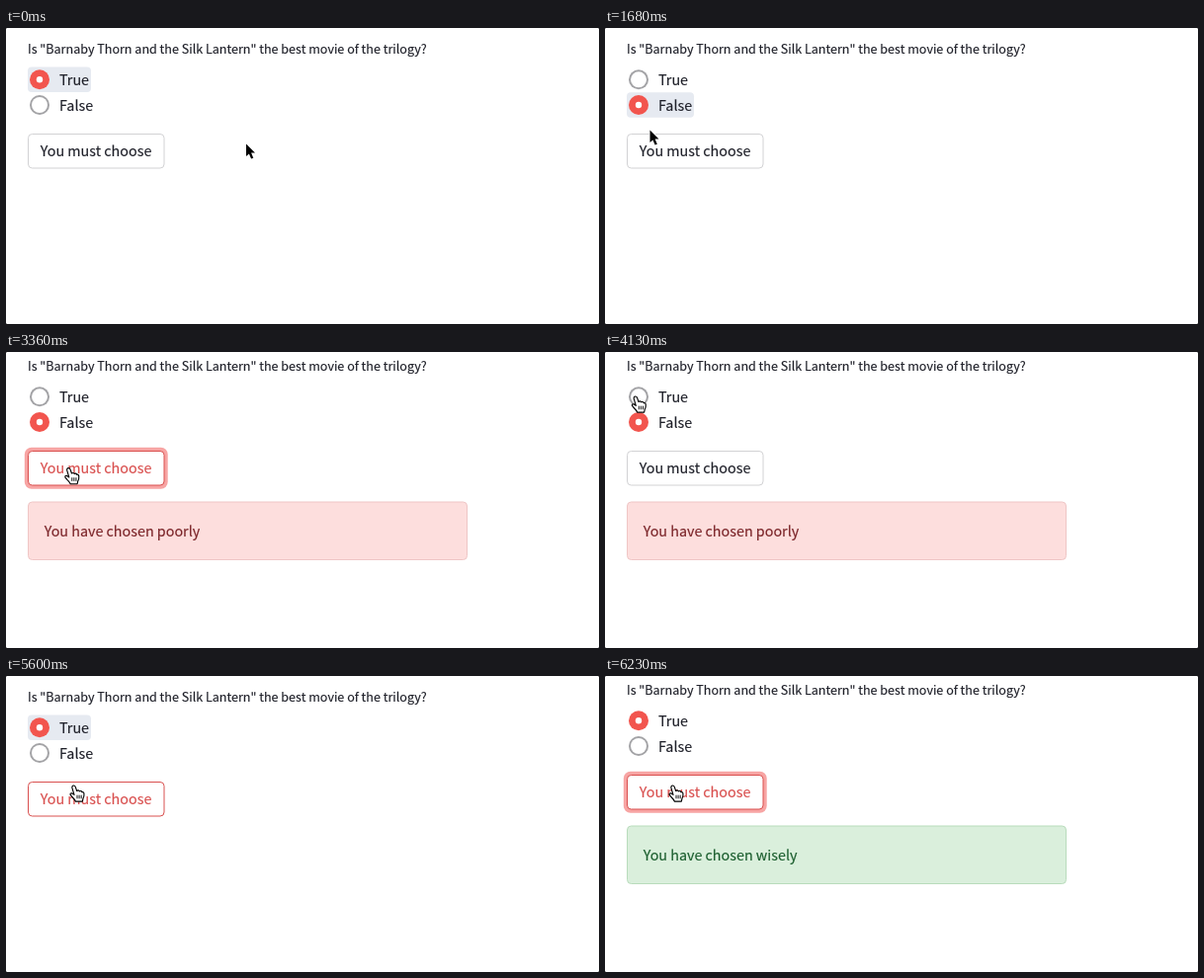
An HTML page with a canvas that plays this animation: 600 by 300 pixels, repeating every 7.21 s.

```html
<!DOCTYPE html>
<html lang="en">
<head>
<meta charset="utf-8">
<title>Radio quiz</title>
<style>
  html, body { margin: 0; width: 100%; height: 100%; overflow: hidden; background: #fff; }
  canvas { display: block; width: 600px; height: 300px; }
</style>
</head>
<body>
<canvas id="stage"></canvas>
<script>
const LOOP = 7210, STEP = 70, SCROLL = 7;
const FONT = '"Noto Sans CJK JP", "Noto Sans CJK SC", "Noto Sans CJK", "Open Sans", sans-serif';
const SMALL = 12.55, BODY = 14.34;
const INK = '#1f2029', RED = '#d9504f', RADIO_RED = '#f2554e', RING = '#a3a3a6';
const QUESTION = 'Is "Barnaby Thorn and the Silk Lantern" the best movie of the trilogy?';

const canvas = document.getElementById('stage');
const ctx = canvas.getContext('2d', { alpha: false });
const dpr = window.devicePixelRatio || 1;
canvas.width = 600 * dpr;
canvas.height = 300 * dpr;

// Pointer hotspot: time, x, y
const PATH = [
  [0, 243, 117], [210, 330, 124], [280, 330, 124], [350, 331, 124],
  [630, 331, 124], [1120, 34, 75], [1260, 34, 75], [1330, 4, 90],
  [1400, 4, 90], [1680, 45.5, 103], [1890, 58, 122], [1960, 58, 122],
  [2030, 60, 132], [2170, 62, 118], [3340, 62, 118], [3560, 126, 100],
  [3780, 70, 62], [3990, 31, 45], [4130, 31, 45], [4340, 16, 55],
  [4550, 47.5, 71.5], [4830, 64, 108], [4970, 68.7, 111], [LOOP, 68.7, 111]
];

const OPTIONS = [
  { text: 'True', y: 52.3, w: 64 },
  { text: 'False', y: 78, w: 68 }
];
const BUTTON = { x: 22.5, y: 107.5, w: 137.5, h: 34.5 };

const between = (t, a, b) => t >= a && t < b;
const ramp = (t, a, b) => Math.min(1, Math.max(0, (t - a) / (b - a)));

function pointerAt(t) {
  const i = PATH.findIndex(k => k[0] > t);
  const a = PATH[i - 1], b = PATH[i];
  const p = ramp(t, a[0], b[0]);
  const e = p * p * (3 - 2 * p);
  return { x: a[1] + (b[1] - a[1]) * e, y: a[2] + (b[2] - a[2]) * e };
}

function stateAt(t) {
  const focus = t < 3000
    ? ramp(t, 2170, 2310)
    : t < 4130 ? 1 : ramp(t, 5600, 5810);
  return {
    scroll: between(t, 2520, 4270) || t >= 5950 ? SCROLL : 0,
    chosen: between(t, 1470, 4200) ? 1 : 0,
    lit: t < 1330 || between(t, 4200, 5670) ? 0 : between(t, 1470, 2240) ? 1 : -1,
    focus,
    poor: between(t, 2520, 4270) ? ramp(t, 2520, 2730) : 0,
    wise: ramp(t, 5950, 6230)
  };
}

// A hairline stroke gives the slightly heavy text smoothing
function text(s, x, y, size, color) {
  ctx.font = `400 ${size}px ${FONT}`;
  ctx.fillStyle = ctx.strokeStyle = color;
  ctx.lineWidth = 0.15;
  ctx.fillText(s, x, y);
  ctx.strokeText(s, x, y);
}

function box(x, y, w, h, r, fill, stroke) {
  ctx.beginPath();
  ctx.roundRect(x, y, w, h, r);
  if (fill) { ctx.fillStyle = fill; ctx.fill(); }
  if (stroke) { ctx.strokeStyle = stroke; ctx.lineWidth = 1; ctx.stroke(); }
}

function disc(x, y, r, color) {
  ctx.beginPath();
  ctx.arc(x, y, r, 0, Math.PI * 2);
  ctx.fillStyle = color;
  ctx.fill();
}

function drawOption(o, on, lit) {
  if (lit) box(22, o.y - 12.8, o.w, 25.6, 4, '#e6eaf1');
  disc(34, o.y, 10, on ? RADIO_RED : RING);
  disc(34, o.y, on ? 3.2 : 8, '#fff');
  text(o.text, 54, o.y + 5.5, BODY, INK);
}

function drawButton(hot, focus) {
  const { x, y, w, h } = BUTTON;
  if (focus) box(x - 3.7, y - 3.7, w + 7.4, h + 7.4, 7, `rgba(240, 75, 72, ${focus / 2})`);
  box(x, y, w, h, 4, '#fff', hot ? RED : '#d2d2d4');
  text('You must choose', 34.8, 130.4, BODY, hot ? RED : INK);
}

function drawAlert(s, alpha, fill, stroke, ink) {
  if (!alpha) return;
  ctx.globalAlpha = alpha;
  box(22.5, 152, 444, 58.5, 4, fill, stroke);
  text(s, 38.7, 186.8, BODY, ink);
  ctx.globalAlpha = 1;
}

function polygon(points) {
  ctx.beginPath();
  points.forEach(([x, y]) => ctx.lineTo(x, y));
  ctx.closePath();
}

function drawArrow() {
  polygon([[0, 0.5], [0, 13], [2.9, 10.4], [5.1, 15.6], [7.3, 14.7], [5.1, 9.6], [9, 9.6]]);
  ctx.lineWidth = 2;
  ctx.strokeStyle = '#fff';
  ctx.stroke();
  ctx.fillStyle = '#000';
  ctx.fill();
}

function drawHand() {
  ctx.translate(-4.5, -0.5);
  ctx.scale(1.04, 1.06);
  ctx.beginPath();
  ctx.moveTo(2.6, 2.7);
  ctx.quadraticCurveTo(2.3, 0.7, 4, 0.5);
  ctx.quadraticCurveTo(5.4, 0.4, 5.9, 2);
  ctx.lineTo(7.2, 5.6);
  ctx.quadraticCurveTo(9, 4.4, 9.8, 6);
  ctx.quadraticCurveTo(11.6, 5, 12.2, 6.8);
  ctx.quadraticCurveTo(14, 6.3, 14.2, 8.5);
  ctx.quadraticCurveTo(14.4, 11, 13.2, 13);
  ctx.lineTo(12.6, 15.7);
  ctx.lineTo(6, 15.7);
  ctx.quadraticCurveTo(5, 13.6, 3, 11.8);
  ctx.lineTo(0.9, 9.4);
  ctx.quadraticCurveTo(0.5, 7.7, 2.2, 7.8);
  ctx.lineTo(4.6, 9.3);
  ctx.closePath();
  ctx.fillStyle = '#fff';
  ctx.fill();
  ctx.strokeStyle = '#000';
  ctx.lineWidth = 1.1;
  ctx.stroke();
  ctx.beginPath();
  for (const x of [7.5, 9.5, 11.5]) {
    ctx.moveTo(x, 9.6);
    ctx.lineTo(x, 13);
  }
  ctx.lineWidth = 0.9;
  ctx.stroke();
}

function drawPointer(p, hand) {
  ctx.save();
  ctx.translate(p.x, p.y);
  ctx.lineJoin = 'round';
  hand ? drawHand() : drawArrow();
  ctx.restore();
}

function drawCorners() {
  ctx.fillStyle = '#aaa';
  for (const x of [0, 599]) for (const y of [0, 299]) ctx.fillRect(x, y, 1, 1);
}

function render(t) {
  const s = stateAt(t), p = pointerAt(t), py = p.y + s.scroll;
  const overButton = p.x > 22 && p.x < 160.5 && py > 107 && py < 142.5;
  const overOption = OPTIONS.some(o =>
    p.x > 22 && p.x < 22 + o.w && Math.abs(py - o.y) < 12.8);

  ctx.setTransform(dpr, 0, 0, dpr, 0, 0);
  ctx.fillStyle = '#fff';
  ctx.fillRect(0, 0, 600, 300);

  ctx.save();
  ctx.translate(0, -s.scroll);
  text(QUESTION, 22, 25.5, SMALL, INK);
  OPTIONS.forEach((o, i) => drawOption(o, s.chosen === i, s.lit === i));
  drawButton(overButton || s.focus > 0, s.focus);
  ctx.restore();

  drawAlert('You have chosen poorly', s.poor, '#fddedd', '#efc6c6', '#7b2529');
  drawAlert('You have chosen wisely', s.wise, '#daefdc', '#b9dcbc', '#1b5e2e');
  drawCorners();
  drawPointer(p, overButton || overOption);
}

const start = performance.now();
function tick() {
  const t = (performance.now() - start) % LOOP;
  render(Math.floor(t / STEP) * STEP);
  requestAnimationFrame(tick);
}
tick();
</script>
</body>
</html>
```
